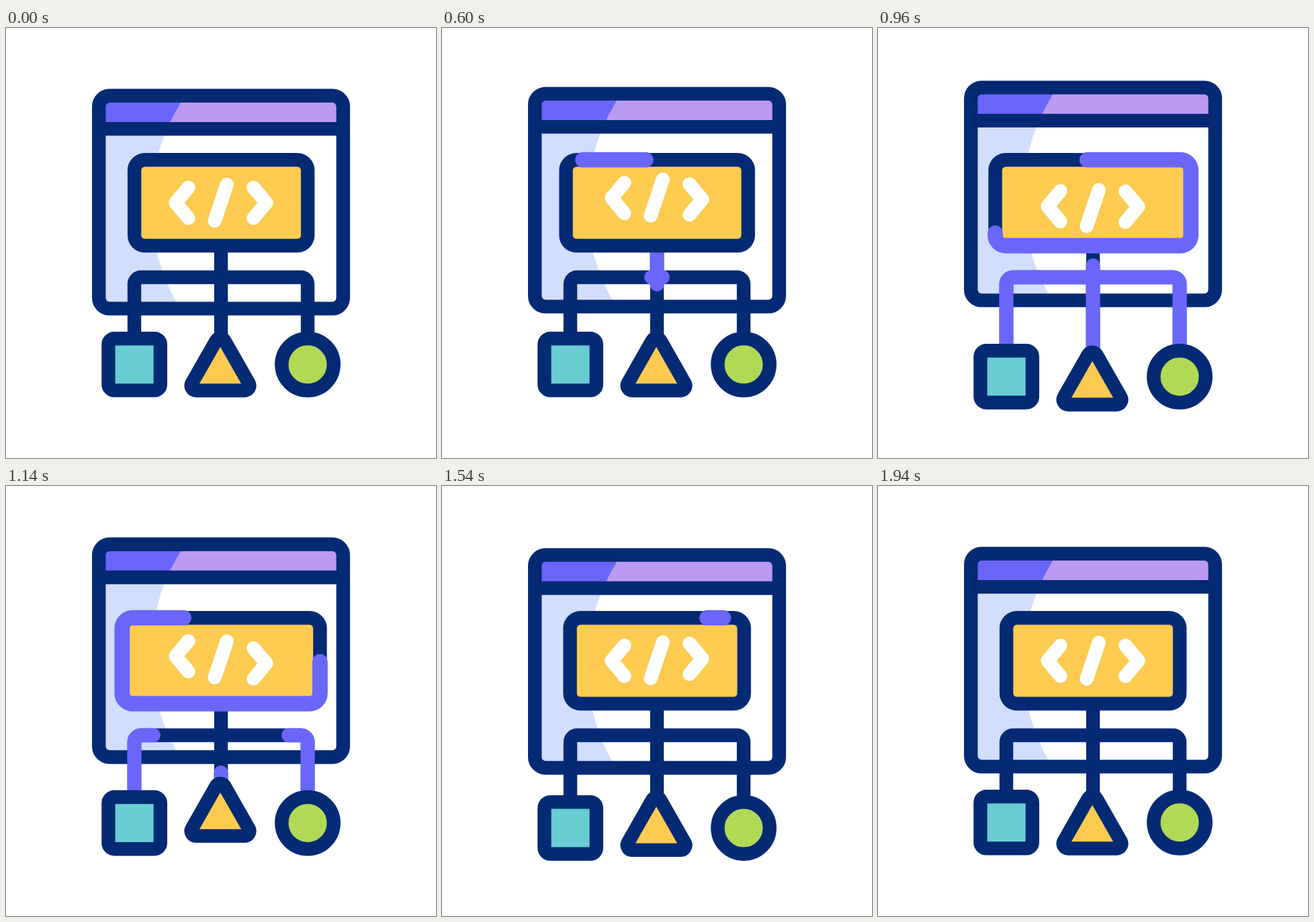
An HTML page for the animation above (2300 ms loop, 640 by 640 pixels).

```html
<!DOCTYPE html>
<html lang="en">
<head>
<meta charset="utf-8">
<title>Code structure</title>
<style>
  html, body { margin: 0; height: 100%; overflow: hidden; background: #fff; }
  svg { display: block; width: 100vw; height: 100vh; }
  .line { stroke: #042a74; stroke-width: 20.4; }
  .mark { stroke: #fff; stroke-width: 20.4; stroke-linecap: round; stroke-linejoin: round; fill: none; }
  .trail { stroke: #6a66f9; stroke-width: 21.2; stroke-linecap: round; fill: none; visibility: hidden; }
  #boxTrail { stroke-width: 22.8; }
</style>
</head>
<body>
<svg viewBox="0 0 640 640">
  <g id="win">
    <rect x="138.2" y="100.8" width="363.6" height="316.8" rx="16" fill="#fff"/>
    <path d="M138 100H267.5A290 290 0 0 0 259.6 418H138z" fill="#d2defd"/>
    <path d="M138 101H502V150H138z" fill="#bb9af2"/>
    <path d="M138 100H267.5A290 290 0 0 0 239.8 150H138z" fill="#6a66f9"/>
    <g class="line" fill="none">
      <rect x="138.2" y="100.8" width="363.6" height="316.8" rx="16"/>
      <path d="M138 150.1H502"/>
    </g>
  </g>

  <g class="line" fill="none">
    <path d="M320 324V490"/>
    <path d="M191 490V381A10 10 0 0 1 201 371H439A10 10 0 0 1 449 381V490"/>
  </g>
  <path class="trail" id="stem" d="M320 324V490"/>
  <path class="trail" id="left" d="M320 371H201A10 10 0 0 0 191 381V490"/>
  <path class="trail" id="right" d="M320 371H439A10 10 0 0 1 449 381V490"/>

  <rect class="line" id="box" y="196.2" height="127.8" rx="15.5" fill="#fdcb50"/>
  <rect class="trail" id="boxTrail" y="196.2" height="127.8" rx="15.5" pathLength="1"/>
  <path class="mark" d="M271.5 237.4L252.5 260L271.5 283"/>
  <path class="mark" d="M328.7 233L310.6 287"/>
  <path class="mark" d="M368.4 237.4L387.5 260L368.4 283"/>

  <g class="line">
    <rect id="square" x="152.4" y="462.2" width="77.4" height="77.2" rx="9" fill="#69cdd1"/>
    <path id="triangle" fill="#fdcb50" d="M325.3 465.3L361.5 528.8A7.3 7.3 0 0 1 355.2 539.5H282.8A7.3 7.3 0 0 1 276.5 528.8L312.7 465.3A7.3 7.3 0 0 1 325.3 465.3z"/>
    <circle id="circle" cx="449" cy="500.8" r="38.7" fill="#b0da55"/>
  </g>
</svg>
<script>
const LOOP = 2300, LAG = 80, CENTER = 320.1;
const STEM = 166, SIDE = 244;
const el = id => document.getElementById(id);
const marks = document.querySelectorAll('.mark');

// Eased 0 to 1 between two times; skew below 1 hurries the first part, above 1 the last.
function ease(t, from, to, skew = 1) {
  const u = Math.min(Math.max((t - from) / (to - from), 0), 1) ** skew;
  return u * u * (3 - 2 * u);
}

// Sum of eased moves, each [start, end, distance, skew].
const sway = (t, ...moves) =>
  moves.reduce((sum, [from, to, by, skew]) => sum + by * ease(t, from, to, skew), 0);

const windowY = t => sway(t, [140, 310, 10.3], [310, 1250, -24.7, 0.55], [1250, 1650, 19.9], [1650, 1940, -5.5]);
const boxGrow = t => sway(t, [140, 325, -7.6], [325, 1200, 26, 0.55], [1200, 1660, -21.4], [1660, 1900, 3]);
const markY = t => sway(t, [280, 555, -8], [555, 875, 16], [875, 1195, -16], [1195, 1515, 8]);
const shapeY = t => sway(t, [690, 940, 22], [940, 1165, -42], [1165, 1385, 30.5], [1385, 1610, -10.5]);

const boxFrom = t => 0.012 + 1.273 * ease(t, 510, 1600, 1.8);
const boxTo = t => 0.012 + 1.273 * ease(t, 540, 1500, 0.6);
const lineFrom = t => ease(t, 805, 1385);
const lineTo = t => ease(t, 490, 770);

const moveY = (id, y) => el(id).setAttribute('transform', `translate(0 ${y})`);

function trim(id, from, to, period) {
  const node = el(id), length = Math.max(to - from, 0);
  node.style.visibility = length > 0 ? 'visible' : 'hidden';
  node.setAttribute('stroke-dasharray', `${length} ${period - length}`);
  node.setAttribute('stroke-dashoffset', -from);
}

function draw(t) {
  moveY('win', windowY(t));

  const half = 129 + boxGrow(t);
  for (const id of ['box', 'boxTrail']) {
    el(id).setAttribute('x', CENTER - half);
    el(id).setAttribute('width', 2 * half);
  }
  marks.forEach((mark, i) =>
    mark.setAttribute('transform', `translate(0 ${markY(t - LAG * i)})`));

  const late = t - LAG;
  moveY('triangle', shapeY(t));
  for (const id of ['square', 'circle']) moveY(id, shapeY(late - 8));

  trim('boxTrail', boxFrom(t), boxTo(t), 1);
  trim('stem', STEM * lineFrom(t), STEM * lineTo(t), 999);
  for (const id of ['left', 'right']) trim(id, SIDE * lineFrom(late), SIDE * lineTo(late), 999);
}

const start = performance.now();
function tick() {
  draw((performance.now() - start) % LOOP);
  requestAnimationFrame(tick);
}
tick();
</script>
</body>
</html>
```
